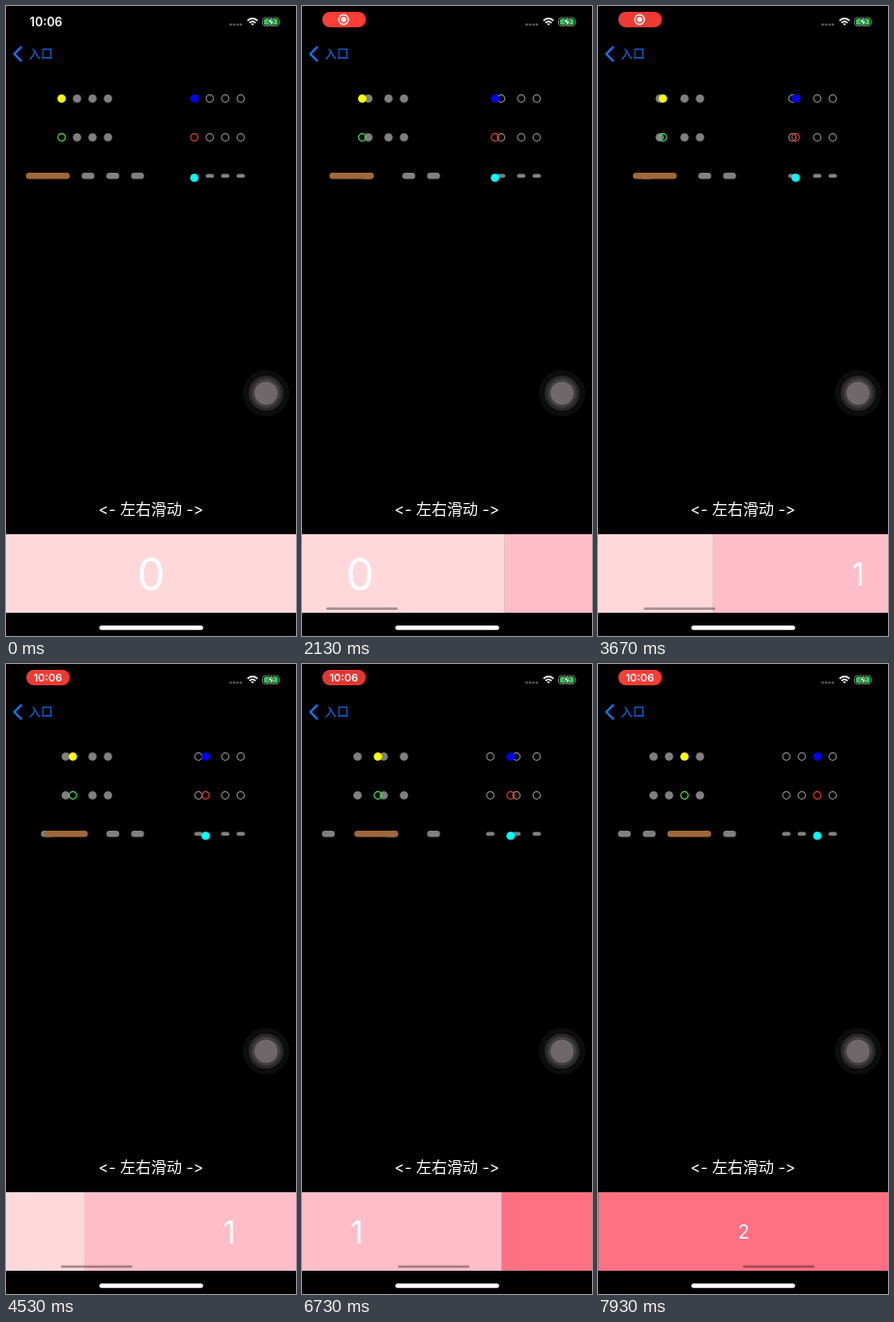
Recreate the animation shown at these times as an HTML page. Size 300 by 650 pixels, loop 8 s.

```html
<!DOCTYPE html>
<html lang="zh">
<head>
<meta charset="utf-8">
<style>
html, body { margin: 0; width: 100%; height: 100%; overflow: hidden; background: #000; }
svg { display: block; width: 300px; height: 650px; font-family: Inter, "Noto Sans CJK SC", "Noto Sans CJK", sans-serif; }
text { fill: #fff; text-anchor: middle; }
.hint { font-size: 16px; font-variant-ligatures: none; font-feature-settings: "calt" 0; }
.clock { font-weight: 600; }
</style>
</head>
<body>
<svg viewBox="0 0 300 650">
  <defs><clipPath id="pagerClip"><rect y="545" width="300" height="81"/></clipPath></defs>
  <rect width="300" height="650"/>

  <text id="plainClock" class="clock" x="41.5" y="21" font-size="12.5">10:06</text>
  <g id="pill">
    <rect id="pillBack" x="21" y="6" width="45" height="16" rx="8"/>
    <g id="recordIcon">
      <circle cx="43" cy="14" r="5" fill="none" stroke="#fff" stroke-width="1.3"/>
      <circle cx="43" cy="14" r="2.8" fill="#fff"/>
    </g>
    <text id="pillClock" class="clock" x="43.3" y="18" font-size="11">10:06</text>
  </g>

  <g fill="#58585a">
    <circle cx="232.5" cy="19.3" r="1.3"/><circle cx="236" cy="19.3" r="1.3"/>
    <circle cx="239.5" cy="19.3" r="1.3"/><circle cx="243" cy="19.3" r="1.3"/>
  </g>
  <g fill="none" stroke="#fff" stroke-width="1.6">
    <path d="M249.8 15.2Q255 10.7 260.2 15.2M251.8 17.3Q255 14.6 258.2 17.3"/>
    <path d="M253.4 18.4Q255 17.2 256.6 18.4L255 20.1Z" fill="#fff" stroke="none"/>
  </g>
  <rect x="265.5" y="12" width="17" height="8.6" rx="2.6" fill="none" stroke="#777"/>
  <rect x="266.8" y="13.2" width="14.4" height="6.2" rx="1.5" fill="#32d158"/>
  <path d="M283.8 14.8q1.4 1.5 0 3z" fill="#777"/>
  <path d="M275.7 10.8L270.6 17h3l-1.2 4.8 5.2-6.4h-3.1z" fill="#fff" stroke="#000" stroke-width=".6"/>

  <path d="M15.5 42.5L8.5 49.5L15.5 56.5" fill="none" stroke="#0a7aff" stroke-width="2.2" stroke-linecap="round" stroke-linejoin="round"/>
  <text x="36" y="54" font-size="12.4" style="fill:#0a7aff">入口</text>

  <g id="controls"></g>

  <circle cx="269" cy="399.5" r="24" fill="#0d0d0d"/>
  <circle cx="269" cy="399.5" r="18" fill="#2a2829"/>
  <circle cx="269" cy="399.5" r="15" fill="#413d3f"/>
  <circle cx="269" cy="399.5" r="12" fill="#6e686a"/>

  <text class="hint" x="150" y="525">&lt;- 左右滑动 -&gt;</text>

  <g clip-path="url(#pagerClip)">
    <g id="pages"></g>
    <rect id="scrollbar" y="620.6" width="74" height="2.4" rx="1.2" fill="#000" fill-opacity=".35"/>
  </g>
  <rect x="96.5" y="639.3" width="107.5" height="4.4" rx="2.2" fill="#fff"/>
</svg>
<script>
const LOOP = 8000, PAGE = 300, GRAY = '#808080';
const $ = id => document.getElementById(id);

// Swipe position in pixels at given times
const swipe = [
  [0, 0], [1080, 0], [1270, 2], [1800, 20], [2130, 90], [2600, 124], [3000, 161],
  [3500, 173], [4350, 218], [4530, 219], [5000, 226], [5200, 226], [5450, 265],
  [5700, 291], [5950, 299.6], [6100, 300], [6730, 393], [6930, 427], [7150, 522],
  [7450, 587], [7730, 599], [7930, 599.5], [8000, 599.5]
];

function add(parent, tag, attrs) {
  const el = document.createElementNS('http://www.w3.org/2000/svg', tag);
  for (const key in attrs) el.setAttribute(key, attrs[key]);
  return parent.appendChild(el);
}

const clamp = v => Math.max(0, Math.min(1, v));
const ramp = (t, start, end) => clamp((t - start) / (end - start));

const secant = i => swipe[i + 1] ? (swipe[i + 1][1] - swipe[i][1]) / (swipe[i + 1][0] - swipe[i][0]) : 0;
function tangent(i) {
  const a = i ? secant(i - 1) : 0, b = secant(i);
  return a * b > 0 ? 2 * a * b / (a + b) : 0;
}

// Monotone cubic through the swipe points
function scrollAt(t) {
  let i = 0;
  while (i < swipe.length - 2 && t >= swipe[i + 1][0]) i++;
  const [t0, a] = swipe[i], [t1, b] = swipe[i + 1];
  const h = t1 - t0, u = (t - t0) / h, v = 1 - u;
  return a * v * v * (1 + 2 * u) + b * u * u * (3 - 2 * u)
    + h * u * v * (tangent(i) * v - tangent(i + 1) * u);
}

function dot(color) {
  return { tag: 'circle', attrs: { r: 4.3, fill: color } };
}
function ring(color) {
  return { tag: 'circle', attrs: { r: 3.8, fill: 'none', stroke: color, 'stroke-width': 1.2 } };
}
function bar(width, height, color) {
  return { tag: 'rect', attrs: { x: -width / 2, y: -height / 2, width, height, rx: height / 2, fill: color } };
}

// A page control: the current mark trades places with each neighbour as the pages move
function pageControl(x, y, step, normal, current, extra = 0, drop = 0) {
  const make = shape => add($('controls'), shape.tag, shape.attrs);
  const others = [1, 2, 3].map(() => make(normal));
  const marker = make(current);
  const place = (el, px, py) => el.setAttribute('transform', `translate(${px} ${py})`);
  return p => {
    others.forEach((el, i) => {
      const passed = clamp(p - i);
      place(el, x + (i + 1 - passed) * step + extra * (1 - passed), y);
    });
    place(marker, x + p * step + extra / 2, y + drop);
  };
}

const controls = [
  pageControl(57.5, 95.5, 16, dot(GRAY), dot('#ffff00')),
  pageControl(194.8, 95.5, 16, ring(GRAY), dot('#0000ff')),
  pageControl(57.5, 135.5, 16, dot(GRAY), ring('#35e24b')),
  pageControl(194.8, 135.5, 16, ring(GRAY), ring('#e5352f')),
  pageControl(27.3, 175.3, 25.6, bar(13.3, 6.4, GRAY), bar(45.3, 6.4, '#a0673a'), 32),
  pageControl(194.8, 175.3, 16, bar(8.6, 4, GRAY), dot('#00ffff'), 0, 2)
];

[['#ffd8dc', 46], ['#ffbdc9', 32], ['#ff7082', 20]].forEach(([fill, size], i) => {
  add($('pages'), 'rect', { x: i * PAGE, y: 545, width: PAGE, height: 81, fill });
  add($('pages'), 'text', { x: (i + 0.5) * PAGE, y: 586 + size * 0.36, 'font-size': size }).textContent = i;
});

function draw(t) {
  const scroll = scrollAt(t);
  controls.forEach(update => update(scroll / PAGE));
  $('pages').setAttribute('transform', `translate(${-scroll} 0)`);
  $('scrollbar').setAttribute('x', 3 + scroll * 0.245);
  $('scrollbar').setAttribute('opacity', ramp(t, 1080, 1150));

  const shown = ramp(t, 400, 600), clock = ramp(t, 3700, 3900);
  const light = (236 + 20 * Math.cos((t - 2100) * Math.PI / 1000)) / 256;
  $('plainClock').setAttribute('opacity', 1 - shown);
  $('pill').setAttribute('opacity', shown);
  $('pillBack').setAttribute('fill', `rgb(${255 * light},${62 * light},${54 * light})`);
  $('recordIcon').setAttribute('opacity', 1 - clock);
  $('pillClock').setAttribute('opacity', clock);
}

function tick() {
  draw(performance.now() % LOOP);
  requestAnimationFrame(tick);
}
tick();
</script>
</body>
</html>
```
